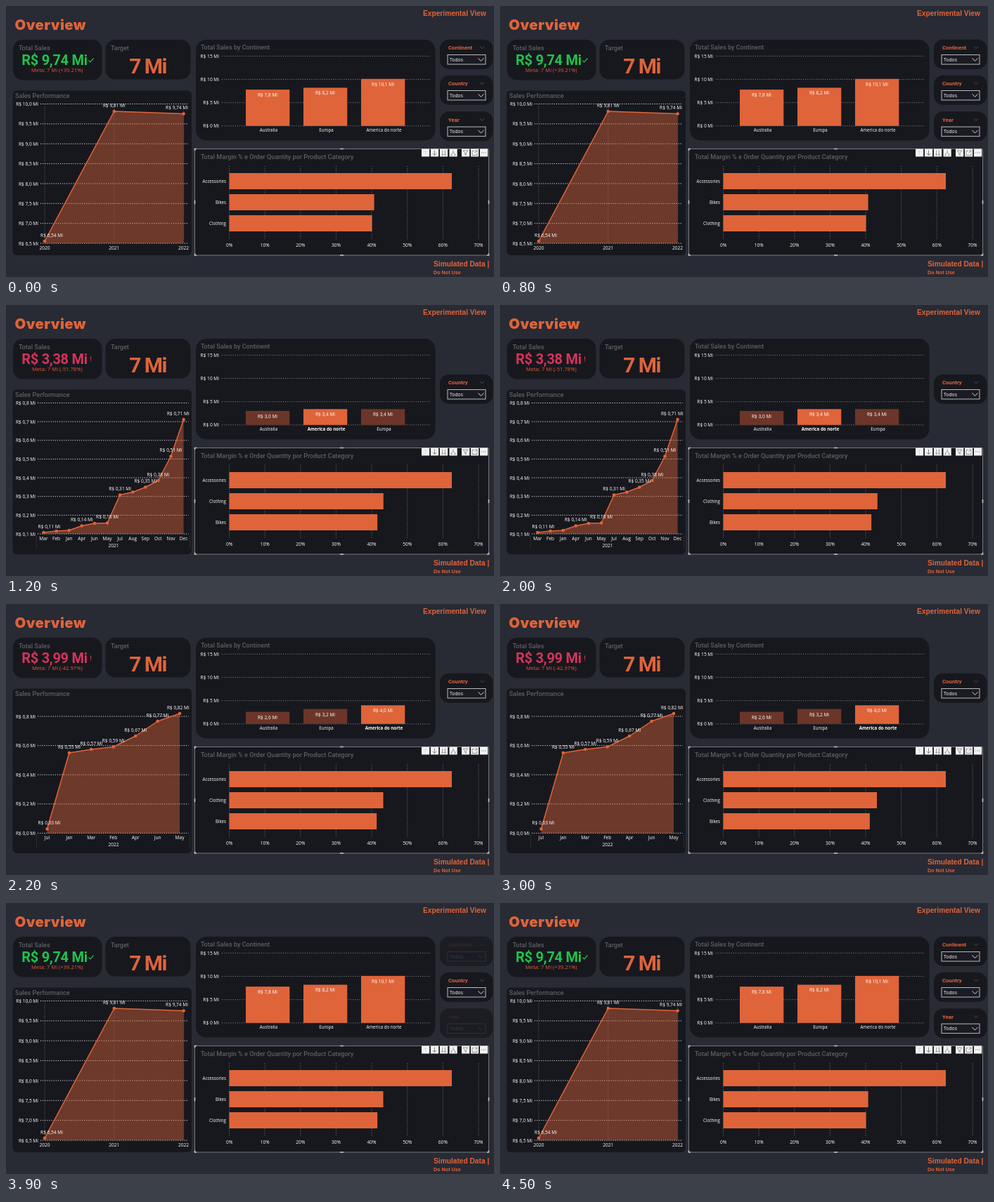
These frames come from a looping animation (694 px wide and 386 px high, 5800 ms). An HTML page:

```html
<!DOCTYPE html>
<html lang="en">
<head>
<meta charset="utf-8">
<title>Overview</title>
<style>
  html, body { margin: 0; width: 100%; height: 100%; overflow: hidden; background: #282a34; }
  svg { display: block; width: 694px; height: 386px; }
  text { font-family: "Open Sans", "Noto Sans", sans-serif; white-space: pre; }
  .din { font-family: Roboto, sans-serif; font-weight: 700; }
  .arial { font-family: "Liberation Sans", Arial, sans-serif; font-weight: 700; }
  .head { font-family: Inter, sans-serif; font-weight: 900; letter-spacing: 0.4px; }
  .title { font-family: Roboto, sans-serif; font-weight: 500; }
  .total { letter-spacing: -0.3px; }
  .goal { letter-spacing: -1.6px; }
  .bold { font-weight: 700; }
</style>
</head>
<body>
<svg id="stage" viewBox="0 0 694 386"></svg>
<script>
const ORANGE = '#df643a', DIM = '#6b3629', PANEL = '#17181e', TITLE = '#5e5f63', WHITE = '#fff';
const LOOP = 5800, STEP = 100;
const stage = document.getElementById('stage');

function el(parent, tag, attrs, content) {
  const node = document.createElementNS('http://www.w3.org/2000/svg', tag);
  for (const key in attrs) node.setAttribute(key, attrs[key]);
  if (content !== undefined) node.textContent = content;
  return parent.appendChild(node);
}
const group = parent => el(parent, 'g', {});
const rect = (p, x, y, width, height, fill, more) => el(p, 'rect', { x, y, width, height, fill, ...more });
const path = (p, d, stroke, width = 1, more) =>
  el(p, 'path', { d, stroke, 'stroke-width': width, fill: 'none', ...more });
const panel = (p, x, y, w, h, rx) => rect(p, x, y, w, h, PANEL, { rx });
const dots = (p, d, stroke) => path(p, d, stroke, 1, { 'stroke-dasharray': '1.2 1.9' });

// y is the vertical middle of the capitals
function text(p, str, x, y, size, fill = WHITE, anchor = 'start', cls = '') {
  return el(p, 'text', {
    x, y: y + size * 0.36, 'font-size': size, fill, 'text-anchor': anchor, class: cls
  }, str);
}
const money = (v, digits) => `R$ ${v.toFixed(digits).replace('.', ',')} Mi`;

// Fixed parts
text(stage, 'Overview', 12.5, 26.3, 20.3, ORANGE, 'start', 'head');
text(stage, 'Experimental View', 593, 10.5, 10.2, ORANGE, 'start', 'arial');
text(stage, 'Simulated Data |', 608, 367.5, 10.2, ORANGE, 'start', 'arial');
text(stage, 'Do Not Use', 608, 379.3, 7.2, ORANGE, 'start', 'arial');

panel(stage, 10, 48, 126.5, 57.5, 14);
panel(stage, 141.5, 48, 121, 56.5, 14);
panel(stage, 270, 48, 340.5, 143.5, 15);
panel(stage, 9.5, 120.5, 254.5, 234.5, 6);
panel(stage, 268.5, 203.5, 418, 151.5, 3);

for (const [str, x, y] of [
  ['Total Sales', 18, 59.5], ['Target', 149, 59.5], ['Total Sales by Continent', 277, 59],
  ['Sales Performance', 13, 127.5], ['Total Margin % e Order Quantity por Product Category', 277, 214.5]
]) text(stage, str, x, y, 9.1, TITLE, 'start', 'title');

text(stage, '7 Mi', 201.5, 85.2, 30, ORANGE, 'middle', 'din goal');

for (let v = 0; v <= 15; v += 5) {
  const y = 170.8 - v * 6.63;
  text(stage, money(v, 0), 303, y, 6.6, WHITE, 'end');
  dots(stage, `M307 ${y}H604`, '#77787c');
}

// Margin chart
const marginX = pct => 317.5 + pct * 5.064;
for (let pct = 0; pct <= 70; pct += 10) {
  dots(stage, `M${marginX(pct)} 228V333`, '#66676b');
  text(stage, pct + '%', marginX(pct), 341, 6.6, WHITE, 'middle');
}
const marginBars = [238, 268, 298].map(y => rect(stage, 317.5, y, 0, 23, ORANGE));
const marginNames = [249.8, 280, 310].map(y => text(stage, '', 313, y, 6.2, WHITE, 'end'));

// Selection frame and toolbar
rect(stage, 268.5, 203.5, 418, 151.5, 'none', { stroke: '#77777b', rx: 1 });
path(stage, 'M268.5 206V203.5H271M684 355H686.5V352.5M268.5 352.5V355H271M475 203.5H480M475 355H480' +
  'M268.5 277V282M686.5 277V282', '#c4c4c6', 1.6);
const icons = [
  [591, 'M5.5 9V2.5M3.5 4.5L5.5 2.5L7.5 4.5', '#d4d4d4'],
  [604, 'M5.5 2V9M2.8 6.3L5.5 9L8.2 6.3', '#777'],
  [617, 'M3.7 2V9M7.3 2V9M2.3 7.5L3.7 9L5 7.5M6 7.5L7.3 9L8.7 7.5', '#888'],
  [630.5, 'M5.5 2V5M3 9V7L5.5 5L8 7V9M2 9H4M7 9H9', '#888'],
  [648, 'M2 2.5H9L6.3 5.8V9L4.7 8V5.8Z', '#888'],
  [661, 'M5 3H2V9H9V6M6 2.5H9V5M9 2.5L5.5 6', '#888'],
  [674, 'M2.2 5.5H3.4M4.9 5.5H6.1M7.6 5.5H8.8', '#666']
];
for (const [x, d, color] of icons) {
  rect(stage, x, 203.5, 11.2, 11, '#f3f3f3');
  path(stage, d, color, 0.9, { transform: `translate(${x} 203.5)` });
}

// Slicers
function slicer(name, y) {
  const back = panel(stage, 617, y, 75.5, 42, 13);
  const g = group(stage);
  text(g, name, 629, y + 11.7, 7.8, ORANGE, 'start', 'din');
  path(g, `M674 ${y + 10}l3 3l3 -3`, '#55565b', 0.9);
  rect(g, 628, y + 21.8, 54, 13.5, '#1b1c23', { stroke: '#b9b9bc' });
  text(g, 'Todos', 631, y + 28.6, 6.8);
  path(g, `M671.5 ${y + 26.7}l4 4l4 -4`, '#d8d8d8');
  return { back, g };
}
const fading = [slicer('Continent', 47.7), slicer('Year', 150.3)];
slicer('Country', 98.7);

// Views: card, line chart and continent bars
const points = (x0, dx, ys) => ys.map((y, i) => [x0 + dx * i, y]);
const views = [
  {
    total: 9.74, meta: '+39.21%', good: true,
    axis: { top: 10, step: 0.5, n: 8, y: 139.5, dy: 28.36, right: 46 }, base: 338,
    pts: points(55, 98.8, [335, 150, 153.5]), names: ['2020', '2021', '2022'], nameY: 344.3,
    tags: [[0, 6.54], [1, 9.81], [2, 9.74]], tagRange: [65, 243],
    bars: [['Australia', 7.8], ['Europa', 8.2], ['America do norte', 10.1]],
    products: ['Bikes', 'Clothing']
  },
  {
    total: 3.38, meta: '-51.78%', year: '2021',
    axis: { top: 0.8, step: 0.1, n: 8, y: 139.5, dy: 26.64, right: 42 }, base: 326,
    pts: points(53.5, 18.1, [324, 322, 321, 314.5, 311, 310.5, 270.5, 266.5, 259.5, 250, 215.5, 163]),
    names: 'Mar Feb Jan Apr Jun May Jul Aug Sep Oct Nov Dec'.split(' '), nameY: 333,
    tags: [[0, 0.11], [3, 0.14], [5, 0.16], [6, 0.31], [8, 0.35], [9, 0.38], [10, 0.51], [11, 0.71]],
    tagRange: [61.5, 244.8],
    bars: [['Australia', 3], ['America do norte', 3.4], ['Europa', 3.4]], picked: 1,
    products: ['Clothing', 'Bikes']
  },
  {
    total: 3.99, meta: '-42.97%', year: '2022',
    axis: { top: 0.8, step: 0.2, n: 5, y: 160, dy: 41.6, right: 42 }, base: 326.5,
    pts: points(58.5, 31.42, [320.5, 212, 207, 203.5, 188, 167, 156]),
    names: 'Jul Jan Mar Feb Apr Jun May'.split(' '), nameY: 333,
    tags: [0.03, 0.55, 0.57, 0.59, 0.67, 0.77, 0.82].map((v, i) => [i, v]), tagRange: [61.5, 244.8],
    bars: [['Australia', 2.6], ['Europa', 3.2], ['America do norte', 4]], picked: 2,
    products: ['Clothing', 'Bikes']
  }
];

function drawCard(g, v) {
  const color = v.good ? '#20c24b' : '#d3345a';
  text(g, money(v.total, 2), 69, 77, 20, color, 'middle', 'din total');
  if (v.good) path(g, 'M117.5 77.5L119.8 79.8L124.5 74.5', color, 1.2);
  else path(g, 'M120.5 73.5V78M120.5 79V80.4', color, 1.2);
  text(g, `Meta: 7 Mi (${v.meta})`, 72.8, 91.7, 7.6, '#e25a38', 'middle');
}

function drawLine(g, v) {
  const a = v.axis;
  for (let i = 0; i < a.n; i++) {
    const y = a.y + i * a.dy;
    text(g, money(a.top - i * a.step, 1), a.right, y + 0.2, 6.6, WHITE, 'end');
    dots(g, `M${a.right + 3} ${y}H259.5`, '#dcdcde');
  }
  if (v.year) {
    dots(g, 'M43.5 329V348M261.5 329V348', '#4a4b50');
    text(g, v.year, 153, 342.3, 6.6, WHITE, 'middle');
  } else {
    for (const [x] of v.pts) dots(g, `M${x} 139.5V338`, '#5a5b60');
  }
  const line = 'M' + v.pts.map(p => p.join(' ')).join('L');
  path(g, `${line}V${v.base}H${v.pts[0][0]}Z`, 'none', 0, { fill: ORANGE, 'fill-opacity': 0.43 });
  path(g, line, ORANGE, 1.5, { 'stroke-linejoin': 'round' });
  v.pts.forEach(([x, y], i) => {
    el(g, 'circle', { cx: x, cy: y, r: 2.3, fill: ORANGE });
    text(g, v.names[i], x, v.nameY, 6.6, WHITE, 'middle');
  });
  const [min, max] = v.tagRange;
  for (const [i, value] of v.tags) {
    const [x, y] = v.pts[i];
    text(g, money(value, 2), Math.min(Math.max(x, min), max), y - 8.4, 6.6, WHITE, 'middle');
  }
}

function drawBars(g, v) {
  v.bars.forEach(([name, value], i) => {
    const x = 341 + i * 82, h = value * 6.63, y = 170.8 - h;
    const on = v.picked === undefined || v.picked === i;
    rect(g, x, y, 62.3, h, on ? ORANGE : DIM);
    text(g, money(value, 1), x + 31, y + 7.6, 6.6, WHITE, 'middle');
    text(g, name, x + 32.5, 177, 6.2, WHITE, 'middle', v.picked === i ? 'bold' : '');
  });
}

const layers = views.map(v => {
  const g = group(stage);
  drawCard(g, v);
  drawLine(g, v);
  drawBars(g, v);
  return g;
});

// Timeline: view switches, then tracks of [time, values...]
const switches = [[0, 0], [1000, 1], [2200, 2], [3400, 1], [3900, 0]];
const margins = [
  [0, 40.7, 40.1], [1000, 40.7, 40.1], [1200, 43.3, 41.6], [2100, 43.3, 41.6], [2200, 43.25, 41.4],
  [2300, 43.15, 41.15], [3400, 43.15, 41.15], [3600, 43.25, 41.6], [3900, 43.25, 41.6],
  [4200, 40.7, 40.1], [LOOP, 40.7, 40.1]
];
// Slicer panel, then its contents
const fade = [
  [0, 1, 1], [900, 1, 1], [1000, 0, 0], [3800, 0, 0], [3900, 0.75, 0.13], [4200, 1, 1], [LOOP, 1, 1]
];

function sample(track, t, col) {
  const i = track.findIndex(k => k[0] > t);
  const a = track[i - 1], b = track[i];
  return a[col] + (b[col] - a[col]) * (t - a[0]) / (b[0] - a[0]);
}

function render(t) {
  const current = switches.filter(s => s[0] <= t).pop()[1];
  layers.forEach((g, i) => g.setAttribute('visibility', i === current ? 'visible' : 'hidden'));
  ['Accessories', ...views[current].products].forEach((name, i) => {
    marginNames[i].textContent = name;
    const pct = i ? sample(margins, t, i) : 62.5;
    marginBars[i].setAttribute('width', marginX(pct) - 317.5);
  });
  for (const { back, g } of fading) {
    back.setAttribute('opacity', sample(fade, t, 1));
    g.setAttribute('opacity', sample(fade, t, 2));
  }
}

const start = performance.now();
function tick() {
  const t = (performance.now() - start) % LOOP;
  render(Math.floor(t / STEP) * STEP);
  requestAnimationFrame(tick);
}
tick();
</script>
</body>
</html>
```
